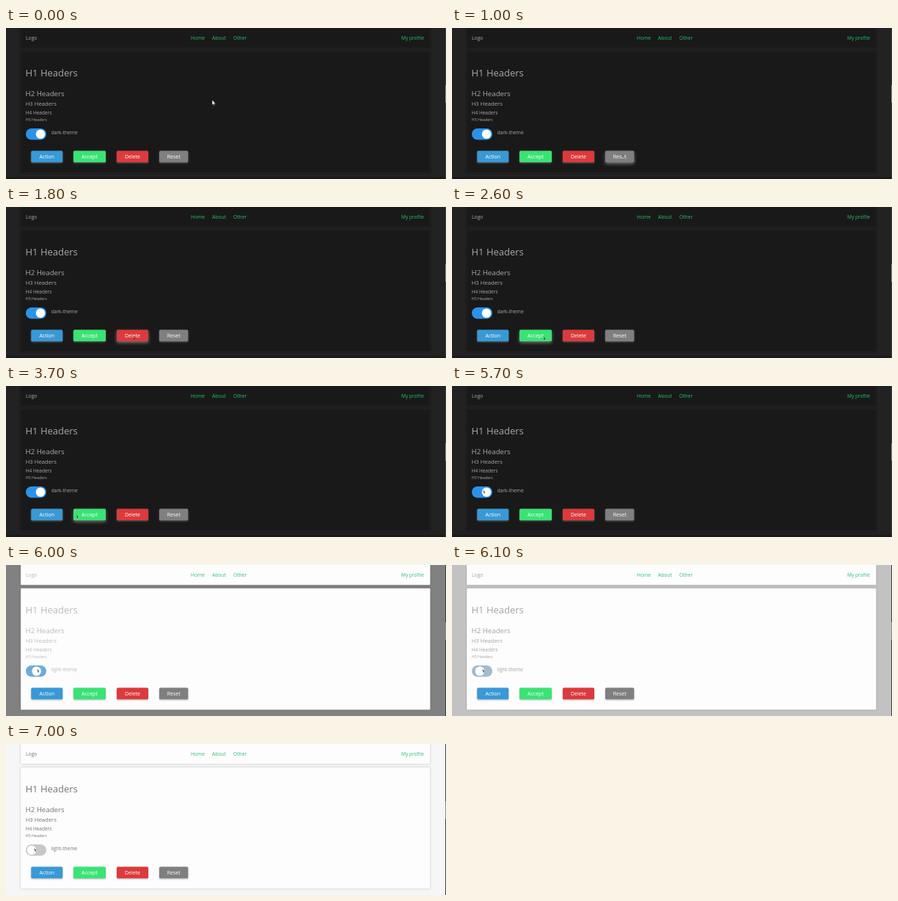
An HTML page for the animation above (8000 ms loop, 600 by 206 pixels).

```html
<!DOCTYPE html>
<html lang="en">
<head>
<meta charset="utf-8">
<title>Theme switch</title>
<style>
  html, body { margin: 0; height: 100%; overflow: hidden; }
  svg { display: block; width: 100vw; height: 100vh; background: var(--bg); }
  text { font-family: "Open Sans", "Noto Sans", sans-serif; fill: var(--text); }
  .link { fill: var(--link); }
  .panel { fill: var(--panel); stroke: var(--edge); stroke-width: .6; filter: drop-shadow(0 .5px 1px var(--shade)); }
  .button rect { filter: drop-shadow(0 1px 1px rgba(135, 135, 135, .6)); }
  .button.hover rect { filter: drop-shadow(0 2px 2px rgba(150, 150, 150, .75)); }
  .button text { fill: #fff; text-anchor: middle; }
  #hand, #arrow { fill: #fff; stroke: #111; stroke-width: .6; stroke-linejoin: round; }
</style>
</head>
<body>
<svg id="stage" viewBox="0 0 600 206">
  <rect id="footer" y="203" width="600" height="3" fill="#1b1a1a"/>
  <rect class="panel" x="20" y="-4" width="558.5" height="31.3" rx="1"/>
  <rect class="panel" x="20" y="31.7" width="558.5" height="165.8" rx="1"/>
  <rect x="599" width="1" height="206" fill="#3c3c3c"/>
  <rect x="599" y="78" width="1" height="24" fill="#8a8a8a"/>
  <rect id="track" x="27" y="137" width="28" height="15.6" rx="7.8"/>
  <circle id="knob" cy="144.8" r="6.3" fill="#fff"/>
  <g id="content"></g>
  <g id="cursor">
    <path id="arrow" d="M0 0V7.2L1.7 5.7 2.8 8.2 3.9 7.7 2.8 5.3H5Z"/>
    <path id="hand" d="M-1 .6Q0-.6 1 .6V3.4Q2-.1 0 2.3 3.5 3.3 3.8Q4.7 3.4 4.8 4.8V6.8Q4.6 8.2 3.9 9.6H-.4L-2.7 6.2Q-2.7 4.6-1 5.9Z"/>
  </g>
</svg>
<script>
const $ = id => document.getElementById(id);
const content = $('content');

function add(parent, tag, attrs, label = '') {
  const el = document.createElementNS('http://www.w3.org/2000/svg', tag);
  for (const key in attrs) el.setAttribute(key, attrs[key]);
  el.textContent = label;
  return parent.appendChild(el);
}

const write = (label, x, y, size, cls = '') =>
  add(content, 'text', { x, y, 'font-size': size, class: cls }, label);

write('Logo', 27, 16, 6.8);
write('Home', 252, 16, 6.7, 'link');
write('About', 281, 16, 6.7, 'link');
write('Other', 310, 16, 6.7, 'link');
write('My profile', 539, 16, 6.6, 'link');
write('H1 Headers', 26.5, 65.6, 13);
write('H2 Headers', 26.5, 92.6, 9.7);
write('H3 Headers', 26.7, 106, 7.7);
write('H4 Headers', 26.7, 117.5, 6.5);
write('H5 Headers', 26.8, 127, 5.3);
const theme = write('', 61.7, 145, 6.6);

const buttons = [
  ['Action', 34.3, 42.9, '#3899d6'],
  ['Accept', 92, 44, '#3ae374'],
  ['Delete', 151, 43, '#dc3a3c'],
  ['Reset', 209, 39.3, '#7f7f7f']
].map(([label, x, width, fill]) => {
  const el = add(content, 'g', { class: 'button' });
  add(el, 'rect', { x, y: 167.4, width, height: 15.8, rx: 1.5, fill });
  add(el, 'text', { x: x + width / 2, y: 177.9, 'font-size': 7 }, label);
  return { el, x, width };
});

// Pointer stops: time, x, y
const route = [
  [0, 281, 98], [500, 231, 174], [600, 231, 174], [700, 232, 173],
  [1400, 232, 173], [1500, 188, 177], [1700, 188, 177], [1800, 174, 177],
  [2200, 174, 177], [2600, 125, 177.5], [3300, 125, 177.5], [4200, 56, 175],
  [4500, 68, 174], [5200, 68, 174], [5700, 43, 143], [6000, 43, 143],
  [6300, 39, 143], [8000, 39, 143]
];

const mix = (a, b, k) => a + (b - a) * k;
const blend = (a, b, k) => `rgb(${a.map((v, i) => Math.round(mix(v, b[i], k)))})`;
const gray = (a, b, k) => blend([a, a, a], [b, b, b], k);

function pointer(t) {
  const i = route.findIndex(stop => stop[0] > t);
  const [t0, x0, y0] = route[i - 1], [t1, x1, y1] = route[i];
  const p = (t - t0) / (t1 - t0), k = p * p * (3 - 2 * p);
  return [mix(x0, x1, k), mix(y0, y1, k)];
}

function paint(t) {
  const light = t >= 6000;
  const p = Math.min(1, Math.max(0, (t - 6000) / 300));
  const k = light ? 1 - .55 * (1 - p) ** 2 : 0;   // theme fade
  const set = (name, value) => $('stage').style.setProperty('--' + name, value);
  set('bg', gray(34, 246, k));
  set('panel', light ? '#fdfdfd' : '#191919');
  set('edge', light ? 'rgba(0,0,0,.06)' : '#2b2b2b');
  set('shade', light ? 'rgba(0,0,0,.2)' : 'rgba(0,0,0,.6)');
  set('text', light ? gray(188, 117, p) : '#a9a9a9');
  set('link', light ? '#2fbf79' : '#1fc567');
  $('footer').style.display = light ? 'none' : '';
  theme.textContent = light ? 'light-theme' : 'dark-theme';
  $('track').setAttribute('fill', blend([42, 147, 232], [200, 200, 200], k));
  $('knob').setAttribute('cx', mix(47, 35, k));

  const [x, y] = pointer(t);
  let over = x > 27 && x < 55 && y > 137 && y < 153;
  for (const b of buttons) {
    const hit = y > 167 && y < 183.5 && x > b.x && x < b.x + b.width;
    b.el.classList.toggle('hover', hit);
    over ||= hit;
  }
  $('cursor').setAttribute('transform', `translate(${x} ${y})`);
  $('hand').style.display = over ? '' : 'none';
  $('arrow').style.display = over ? 'none' : '';
}

const start = performance.now();
function tick() {
  paint(Math.floor((performance.now() - start) % 8000 / 100) * 100);
  requestAnimationFrame(tick);
}
tick();
</script>
</body>
</html>
```
